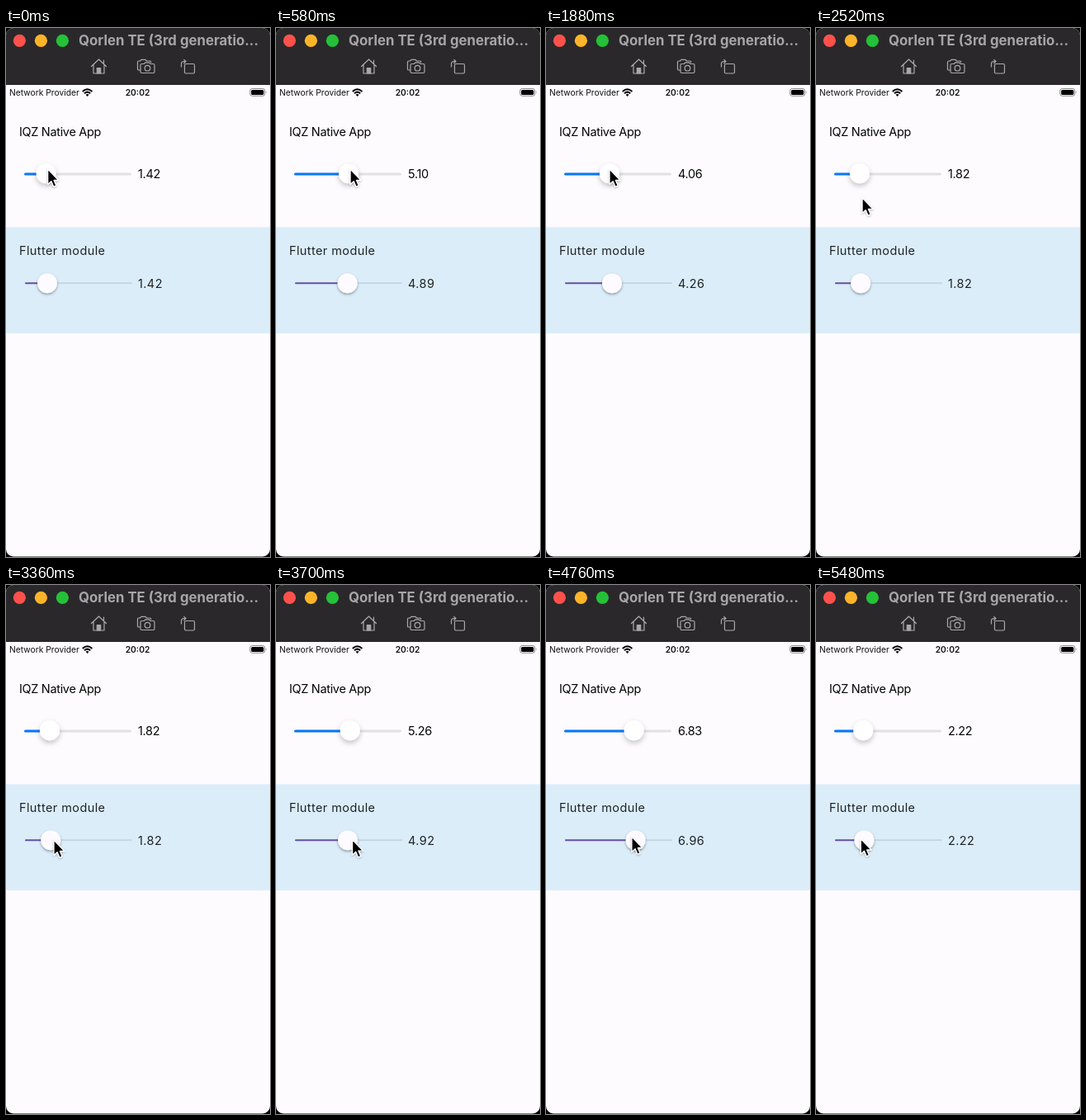
Write an HTML page that moves like this. It is 320 px wide and 641 px high and loops after 5.56 s.

```html
<!DOCTYPE html>
<html lang="en">
<head>
<meta charset="utf-8">
<title>Synced sliders</title>
<style>
  html, body { margin: 0; width: 100%; height: 100%; overflow: hidden; background: #000; }
  svg { display: block; width: 320px; height: 641px; }
  text { font-family: Inter, Roboto, sans-serif; white-space: pre; }
  .title { font-size: 16.8px; font-weight: 700; fill: #a7a5a8; }
  .status { font-size: 10.3px; fill: #111; }
  .clock { font-weight: 600; text-anchor: middle; }
  .native { font-size: 14.5px; letter-spacing: -.33px; fill: #050505; }
  .module { font-size: 14.5px; letter-spacing: .4px; fill: #1f2327; }
  .icon { fill: none; stroke: #aaa8ab; stroke-width: 1.2; stroke-linejoin: round; stroke-linecap: round; }
</style>
</head>
<body>
<svg viewBox="0 0 320 641">
  <defs>
    <clipPath id="window"><rect width="320" height="640.4" rx="9"/></clipPath>
    <filter id="softShadow" x="-60%" y="-60%" width="220%" height="240%">
      <feDropShadow dx="0" dy="3" stdDeviation="3" flood-opacity=".24"/>
    </filter>
    <filter id="tightShadow" x="-60%" y="-60%" width="220%" height="240%">
      <feDropShadow dx="0" dy="1.5" stdDeviation="1.5" flood-opacity=".4"/>
    </filter>
    <filter id="cursorShadow" x="-40%" y="-40%" width="180%" height="180%">
      <feDropShadow dx="0" dy="1" stdDeviation=".8" flood-opacity=".3"/>
    </filter>
  </defs>

  <g clip-path="url(#window)">
    <rect width="320" height="641" fill="#fdfbfe"/>
    <rect width="320" height="69" fill="#2a282b"/>
    <circle cx="16.4" cy="15.3" r="7.6" fill="#fe514b"/>
    <circle cx="42.4" cy="15.3" r="7.6" fill="#feb429"/>
    <circle cx="68.4" cy="15.3" r="7.6" fill="#25c138"/>
    <text class="title" x="88" y="21">Qorlen TE (3rd generatio...</text>

    <g class="icon">
      <path d="M103.5 46.5 112.5 38 121.5 46.5M106 44.5V55H119V44.5M118.5 43V39"/>
      <path d="M110.3 55V48.5H114.7V55Z" fill="#aaa8ab"/>
      <path d="M162.5 51H160.8Q159.5 51 159.5 49.7V41.3Q159.5 40 160.8 40H162.5L164 38.3H169L170.5 40H174.5Q175.8 40 175.8 41.5"/>
      <path d="M164.5 43.5H167.3L168.8 41.8H173.7L175.2 43.5H178.5Q180 43.5 180 45V53Q180 54.5 178.5 54.5H164.5Q163 54.5 163 53V45Q163 43.5 164.5 43.5Z"/>
      <circle cx="171.5" cy="48.7" r="3.3"/>
      <rect x="216.500" y="43.500" width="12" height="11.500" rx="1.500"/>
      <path d="M212.500 47V43.500Q212.500 40.500 215.500 40.500H217.500M215.800 38.300 218 40.500 215.800 42.500"/>
    </g>

    <text class="status" x="4" y="82">Network Provider</text>
    <text class="status clock" x="159.5" y="82">20:02</text>
    <g fill="none" stroke="#000" stroke-width="2">
      <path d="M92.8 77Q98.6 71.5 104.400 77M95 79.300Q98.600 76 102.200 79.300"/>
      <path d="M96.6 80.7Q98.6 79.2 100.6 80.7L98.6 82.9Z" fill="#000" stroke="none"/>
    </g>
    <rect x="295.8" y="73.5" width="18" height="8.8" rx="2.6" fill="none" stroke="#8b898c"/>
    <rect x="297.2" y="74.9" width="15.2" height="6" rx="1.5"/>
    <path d="M315 76.3Q316.5 77.9 315 79.5Z" fill="#8b898c"/>

    <text class="native" x="16" y="131">IQZ Native App</text>
    <rect x="22" y="175.4" width="130" height="3.2" rx="1.6" fill="#e1e0e3"/>
    <rect id="nativeFill" x="22" y="175.4" height="3.2" rx="1.6" fill="#0878fb"/>
    <circle id="nativeKnob" cy="176.3" r="12" fill="#fff" filter="url(#softShadow)"/>
    <text class="native" id="nativeValue" x="160" y="182.3"></text>

    <rect y="241.4" width="320" height="128.6" fill="#dbedf9"/>
    <text class="module" x="16" y="275">Flutter module</text>
    <rect x="23" y="308.3" width="130" height="1.8" rx=".9" fill="#c3d5e3"/>
    <rect id="moduleFill" x="23" y="308.2" height="2" rx="1" fill="#6750a4"/>
    <circle id="moduleKnob" cy="309.2" r="12" fill="#fdfbff" filter="url(#tightShadow)"/>
    <text class="module" id="moduleValue" x="160" y="315"></text>

    <path id="cursor" d="M0 0V18.5L4.2 14.7 7 21.3 10.2 19.9 7.4 13.5H13Z"
      stroke="#fff" stroke-width="1.3" stroke-linejoin="round" filter="url(#cursorShadow)"/>
  </g>
</svg>
<script>
  const LOOP = 5560;
  const MODULE_LAG = 22;

  // Keys are [time, value, slope = 0].
  const VALUE = [[0, 1.42], [1179.5, 8.943], [2300, 1.82], [3360, 1.82], [4080, 9.29],
                 [4138, 9.29], [4760, 6.84, -.0058], [5450, 2.22]];
  const GRIP = [[0, 2], [1120, 2], [1880, 0], [2300, 2], [2850, 5], [3360, 5],
                [4210, -1.3], [4760, -2.7], [5480, -3]];
  const CURSOR_Y = [[2360, 171], [2850, 309], [3360, 309], [4210, 308], [4760, 305], [5480, 307.5]];

  function sample(keys, t) {
    const i = keys.findIndex(key => key[0] > t);
    if (i === 0) return keys[0][1];
    if (i < 0) return keys[keys.length - 1][1];
    const [t0, a, slopeA = 0] = keys[i - 1];
    const [t1, b, slopeB = 0] = keys[i];
    const span = t1 - t0, u = (t - t0) / span;
    const blend = u * u * (3 - 2 * u);
    return a + (b - a) * blend
      + span * u * (1 - u) * (slopeA * (1 - u) - slopeB * u);
  }

  const byId = id => document.getElementById(id);
  const nativeX = value => 33.5 + 10.7 * value;
  const moduleX = value => 35 + 10.57 * value;

  function setSlider(name, left, x, value) {
    byId(name + 'Fill').setAttribute('width', x - left);
    byId(name + 'Knob').setAttribute('cx', x);
    byId(name + 'Value').textContent = value.toFixed(2);
  }

  function render(t) {
    const value = sample(VALUE, t);
    const delayed = sample(VALUE, t - MODULE_LAG);
    setSlider('native', 22, nativeX(value), value);
    setSlider('module', 23, moduleX(delayed), delayed);
    const x = nativeX(value) + sample(GRIP, t);
    byId('cursor').setAttribute('transform', `translate(${x} ${sample(CURSOR_Y, t)})`);
  }

  const start = performance.now();
  function tick() {
    render((performance.now() - start) % LOOP);
    requestAnimationFrame(tick);
  }
  tick();
</script>
</body>
</html>
```
